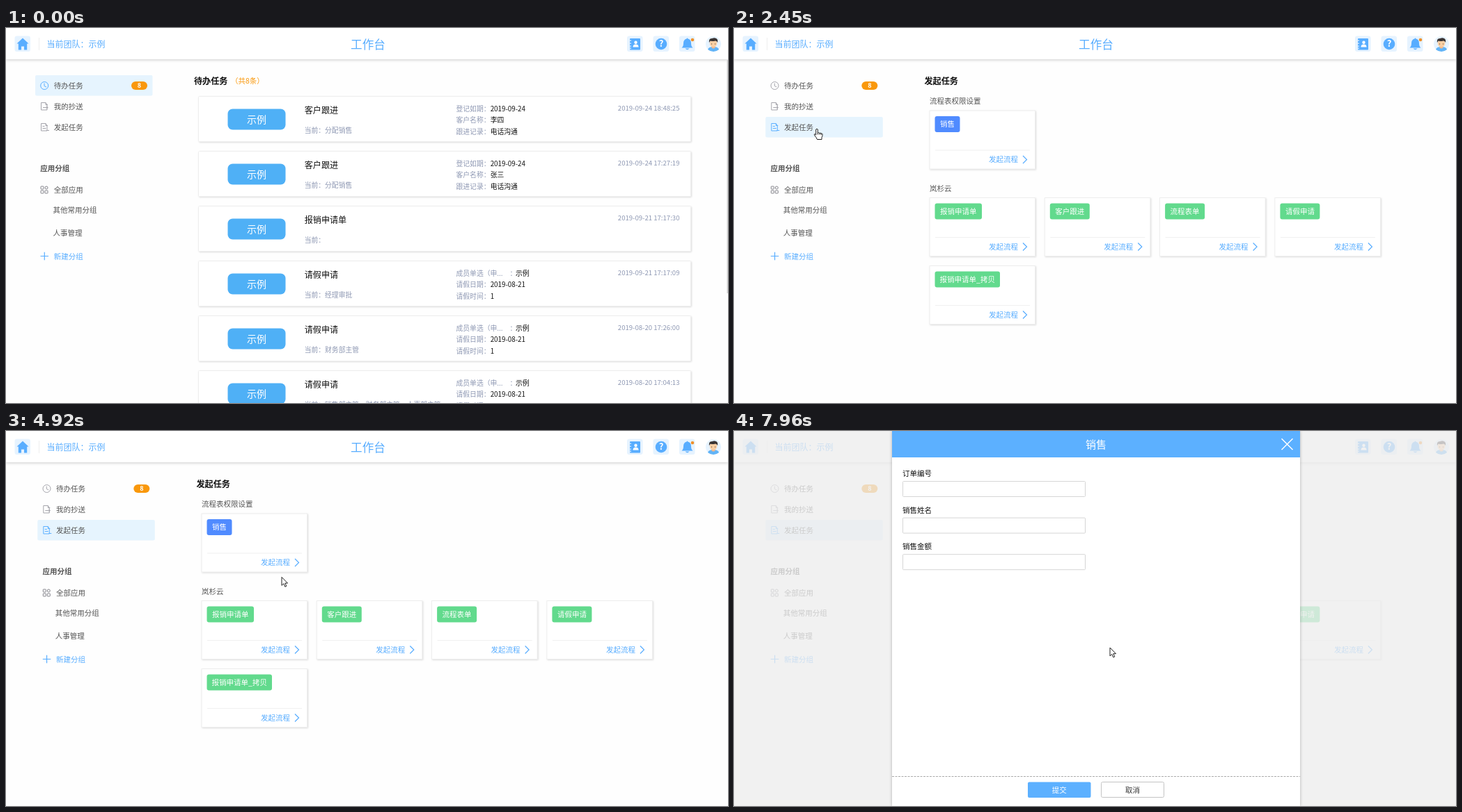
Write an HTML page that moves like this. It is 1037 by 540 pixels and loops after 8000 ms.

```html
<!DOCTYPE html>
<html lang="zh-CN">
<head>
<meta charset="utf-8">
<title>工作台</title>
<style>
html, body { margin: 0; width: 100%; height: 100%; overflow: hidden; background: #fefefe; }
svg { display: block; width: 100vw; height: 100vh; }
text { font-family: "Noto Sans CJK SC", "Open Sans", sans-serif; white-space: pre; }
.card { fill: #fff; stroke: #eee; filter: drop-shadow(1px 1px 1px #0002); }
.card.over { stroke: #f6f6f6; filter: drop-shadow(0 3px 3px #0004); }
.ico { fill: none; stroke: #a5a5ac; }
.ico.on { stroke: #5cb0ff; }
</style>
</head>
<body>
<svg id="stage" viewBox="0 0 1037 540"></svg>
<script>
const LOOP = 8000, BLUE = '#58adff', GREY = '#8e98b3', INK = '#111', SIDE = '#555';
const $ = id => document.getElementById(id);

// y is the vertical middle of the text
const T = (x, y, s, size = 10.5, fill = SIDE, more = '') =>
  `<text x="${x}" y="${y + size * 0.38}" font-size="${size}" fill="${fill}" ${more}>${s}</text>`;
const R = (x, y, w, h, fill, rx = 0, more = '') =>
  `<rect x="${x}" y="${y}" width="${w}" height="${h}" rx="${rx}" fill="${fill}" ${more}/>`;
const P = (d, more = '') => `<path d="${d}" ${more}/>`;
const C = (x, y, r, more = '') => `<circle cx="${x}" cy="${y}" r="${r}" ${more}/>`;
const MID = 'text-anchor="middle"', BOLD = 'font-weight="600"';

function header() {
  const fill = `fill="${BLUE}"`, pale = '#e6f3ff';
  return R(0, 0, 1037, 45, '#fff', 0, 'style="filter:drop-shadow(0 1px 2px #0003)"') +
    R(12.5, 11.5, 22.5, 22.5, pale, 3) +
    P('M24 14.5l8.5 8h-2.3v9h-4.2v-5h-4v5h-4.2v-9h-2.3z', fill) +
    R(47, 14, 1, 18, '#eee') +
    T(58.5, 23.5, '当前团队：示例', 12, BLUE) +
    T(520, 24, '工作台', 16.6, BLUE, MID) +
    [892, 929.5, 967].map(x => R(x, 11.5, 22.5, 22.5, pale, 3)).join('') +
    R(896, 15, 15, 16.5, BLUE, 1) +
    [17.5, 21.5, 25.5, 28.5].map(y => R(895, y, 3, 1.2, pale)).join('') +
    C(904.5, 20.7, 2.2, 'fill="#fff"') + P('M900.5 27.5q0-4 4-4t4 4z', 'fill="#fff"') +
    C(941, 23, 8.3, fill) + T(941, 22.5, '?', 13, '#fff', MID + ' font-weight="700"') +
    P('M970.5 28.5q2.5-2 2.5-6.500q0-5.500 4.500-6.500q1-2 2 0q4.500 1 4.500 6.500q0 4.500 2.500 6.500z', fill) +
    P('M975.5 29.5h6q-3 3.500-6 0z', fill) + C(986, 17, 2.3, 'fill="#f0912b"') +
    C(1016, 23, 11, `fill="${pale}"`) +
    P('M1008 31q1-4 8-4t8 4q-8 6-16 0z', 'fill="#62b4f7"') +
    P('M1013.5 25h5v3.500q-2.500 2-5 0z', 'fill="#f5b98a"') +
    C(1016, 22, 5.3, 'fill="#fbcfa3"') +
    P('M1010 21q-1-6 4-6q6-2 8 2l.2 4q-1.500-2.500-3-2.500q-4 1-7.500 0z', 'fill="#3a3433"') +
    P('M1013.5 22.500v1M1018.500 22.500v1', 'stroke="#3a3433"');
}

function sidebar() {
  const doc = (y, extra) => P(`M57 ${y - 5.5}h-6.500v10.500h8.500v-7.500zv3h3${extra}`, 'class="ico"');
  const cells = [[50, 228], [56, 228], [50, 234], [56, 234]]
    .map(([x, y], i) => R(x, y, 4, 4, 'none', i === 1 ? 2 : 0.5, 'stroke="#85858c"')).join('');
  return `<g id="side"><rect id="mark" x="42" y="68" width="168.500" height="29.500" rx="2" fill="#e6f4fe"/>` +
    `<g id="icons"><g>${C(55.2, 83, 5.5, 'class="ico"')}${P('M55 79.500v4l3 1.500', 'class="ico"')}</g>` +
    `<g>${doc(113, 'M53 114.500h7m-2-2l2 2l-2 2')}</g><g>${doc(143, 'M52.500 141.500h3m-3 3h5M58 147.500h4')}</g></g>` +
    T(68.7, 83.5, '待办任务') + T(68.7, 113.5, '我的抄送') + T(68.7, 143.5, '发起任务') +
    R(180, 77, 23, 12, '#f9980c', 6) + T(191.5, 83, '8', 9, '#fff', MID + ' ' + BOLD) +
    T(49.3, 202.5, '应用分组', 10.5, SIDE, BOLD) + cells + T(68.7, 233, '全部应用') +
    T(67.5, 262.5, '其他常用分组') + T(67.5, 295.5, '人事管理') +
    P('M49.500 328.500h11.500M55.250 322.750v11.500', `stroke="${BLUE}" stroke-width="1.200"`) +
    T(68.7, 328.8, '新建分组', 10.5, BLUE) + '</g>';
}

function taskList() {
  const visit = (date, who) => [['登记如期：', date], ['客户名称：', who], ['跟进记录：', '电话沟通']];
  const leave = [['', '示例'], ['请假日期：', '2019-08-21'], ['请假时间：', '1']];
  const rows = [
    ['客户跟进', '分配销售', '2019-09-24 18:48:25', visit('2019-09-24', '李四')],
    ['客户跟进', '分配销售', '2019-09-24 17:27:19', visit('2019-09-24', '张三')],
    ['报销申请单', '', '2019-09-21 17:17:30', []],
    ['请假申请', '经理审批', '2019-09-21 17:17:09', leave],
    ['请假申请', '财务部主管', '2019-08-20 17:26:00', leave],
    ['请假申请', '销售部主管、财务部主管、人事部主管', '2019-08-20 17:04:13', leave]
  ];
  const row = ([name, step, time, fields], i) => {
    const y = 98.5 + 79 * i;
    return R(276.5, y, 707, 65, '#fff', 1, 'class="card"') +
      R(318.5, y + 18, 83, 30, '#4fb0f6', 7) + T(360, y + 33.5, '示例', 14, '#fff', MID) +
      T(428.7, y + 19.5, name, 12.1, INK) + T(428.7, y + 49, '当前：' + step, 9.8, GREY) +
      T(967.5, y + 17, time, 9.6, GREY, 'text-anchor="end"') +
      fields.map(([label, value], k) => {
        const fy = y + 17.5 + 16.5 * k;
        return label
          ? T(646.5, fy, label, 9.8, GREY) + T(695.7, fy, value, 9.8, INK)
          : T(646.5, fy, '成员单选（申...', 9.8, GREY) + T(723.5, fy, '：', 9.8, GREY) + T(732, fy, value, 9.8, INK);
      }).join('');
  };
  return T(270, 76, '待办任务', 12.1, INK, BOLD) + T(323, 76, '（共8条）', 10.5, '#f9980c') +
    rows.map(row).join('') + R(1035.5, 46, 1.5, 336, '#d0d0d0');
}

const GREEN = '#62da8d';
const flows = [
  [0, 119, '销售', '#508bff'], [0, 244.5, '报销申请单', GREEN], [1, 244.5, '客户跟进', GREEN],
  [2, 244.5, '流程表单', GREEN], [3, 244.5, '请假申请', GREEN], [0, 342.5, '报销申请单_拷贝', GREEN]
].map(([col, y, name, color]) => ({ x: 281 + 165.3 * col, y, name, color }));

function flowCards() {
  const one = ({ x, y, name, color }) => {
    const w = [...name].reduce((sum, c) => sum + (c === '_' ? 5 : 10.5), 15);
    return R(x, y, 151.5, 84, '#fff', 0, 'class="card flow"') +
      R(x + 7.5, y + 8, w, 23, color, 3) + T(x + 7.5 + w / 2, y + 19.5, name, 10.5, '#fff', MID) +
      R(x + 8, y + 56.5, 136, 1, '#f0f0f0') + T(x + 85, y + 70.5, '发起流程', 10.5, BLUE) +
      P(`M${x + 134} ${y + 65}l5.500 5.500l-5.500 5.500`, `fill="none" stroke="${BLUE}" stroke-width="1.200"`);
  };
  return T(281, 105, '流程表权限设置') + T(281, 231, '岚杉云') + flows.map(one).join('');
}

function dialog() {
  const field = (name, i) => {
    const y = 61 + 52.6 * i;
    return T(242, y, name, 10.5, INK, 'font-weight="500"') +
      R(242.5, y + 11.5, 262, 22, '#fff', 1, 'stroke="#d6d6d6"');
  };
  return R(0, 0, 1037, 540, '#eee', 0, 'opacity=".78"') +
    R(227, 0, 586, 540, '#fff', 0, 'style="filter:drop-shadow(0 0 2px #0004)"') +
    R(227, 0, 586, 38, '#5cb0ff') + T(520, 19.5, '销售', 15, '#fff', MID) +
    P('M786.500 11l16 16m0-16l-16 16', 'stroke="#fff" stroke-width="1.500"') +
    '<g id="form">' + ['订单编号', '销售姓名', '销售金额'].map(field).join('') +
    P('M227 497.500h586', 'stroke="#aaa" stroke-dasharray="3 1.500"') +
    R(422, 505.5, 90.5, 22.5, '#5cb0ff', 2) + T(467.3, 517, '提交', 10.5, '#fff', MID) +
    R(527.5, 505.5, 90, 22, '#fff', 2, 'stroke="#c4c4c4"') + T(572.5, 517, '取消', 10.5, '#333', MID) + '</g>';
}

const bars = [0, 1, 2, 3, 4].map(i =>
  `<g class="bar">${R(605.5 + 10.6 * i - 2, 0, 9, 1, '#87ceeb', 0, 'opacity=".3"')}${R(605.5 + 10.6 * i, 0, 5, 1, '#87ceeb')}</g>`).join('');

$('stage').innerHTML = header() + sidebar() +
  `<g id="list">${taskList()}</g>` +
  `<g id="start">${T(273.5, 76, '发起任务', 12.1, INK, BOLD)}<g id="loader">${bars}</g><g id="flows">${flowCards()}</g></g>` +
  `<g id="dialog">${dialog()}</g>` +
  '<g id="cursor" fill="#fff" stroke="#222" stroke-linejoin="round">' +
  P('M0 0v12l2.800-2.600l2 4.500l2-.9l-2-4.300h3.700z', 'id="arrow"') +
  P('M-1.300 1q1.300-1.600 2.600 0v5q1.500-1 2.400.4q1.500-.8 2.300.5q1.600-.5 2 .8q.4 3-1 5v2.800h-6.500q-1-2.600-3.500-5.500q-1.600-2.500 0-2.500l1.700 1.500zM1.300 6v2.500M3.700 6.500v2M6 7v2', 'id="hand"') + '</g>';

const barNodes = document.querySelectorAll('.bar');
const flowNodes = document.querySelectorAll('.flow');
const iconNodes = document.querySelectorAll('#icons > g');

// time, x, y of the pointer
const path = [
  [0, 330, 565], [70, 330, 560], [860, 117, 146], [1100, 115, 145], [1490, 119, 145], [2450, 119, 145],
  [3330, 411, 204], [4130, 398, 241], [5400, 395, 196], [5640, 396, 194], [6680, 396, 194],
  [7400, 537, 308], [7880, 537, 308], [7960, 540, 312], [LOOP, 540, 312]
];

function pointer(t) {
  const i = path.findIndex(p => p[0] > t);
  const [t0, x0, y0] = path[i - 1], [t1, x1, y1] = path[i];
  const k = (t - t0) / (t1 - t0), e = k * k * (3 - 2 * k);
  return [x0 + (x1 - x0) * e, y0 + (y1 - y0) * e];
}

const show = (id, on) => { $(id).style.display = on ? '' : 'none'; };
const inside = (px, py, x, y, w, h) => px >= x && px <= x + w && py >= y && py <= y + h;

function draw(t) {
  const started = t >= 940, loaded = t >= 1490, open = t >= 6120;
  const [px, py] = pointer(t);

  show('list', !started);
  show('start', started);
  show('loader', !loaded);
  show('flows', loaded);
  show('dialog', open);
  show('form', t >= 6680);

  $('side').setAttribute('transform', `translate(${started ? 3.3 : 0} 0)`);
  $('mark').setAttribute('y', started ? 128 : 68);
  iconNodes.forEach((g, i) => {
    for (const shape of g.children) shape.classList.toggle('on', i === (started ? 2 : 0));
  });

  barNodes.forEach((bar, i) => {
    const h = 18 + 18 * Math.max(0, Math.cos(2 * Math.PI * (t - 1100) / 1000 - 0.48 * i));
    bar.setAttribute('transform', `translate(0 ${195 - h / 2}) scale(1 ${h})`);
  });

  let hand = inside(px, py, 42, 68, 171, 90);
  flows.forEach(({ x, y }, i) => {
    flowNodes[i].classList.toggle('over', loaded && inside(px, py, x, y, 151, 84));
    if (loaded && inside(px, py, x + 83, y + 62, 60, 16)) hand = true;
  });
  hand = hand && !open;
  show('hand', hand);
  show('arrow', !hand);
  $('cursor').setAttribute('transform', `translate(${px.toFixed(1)} ${py.toFixed(1)})`);
}

const begin = performance.now();
function tick() {
  draw((performance.now() - begin) % LOOP);
  requestAnimationFrame(tick);
}
tick();
</script>
</body>
</html>
```
